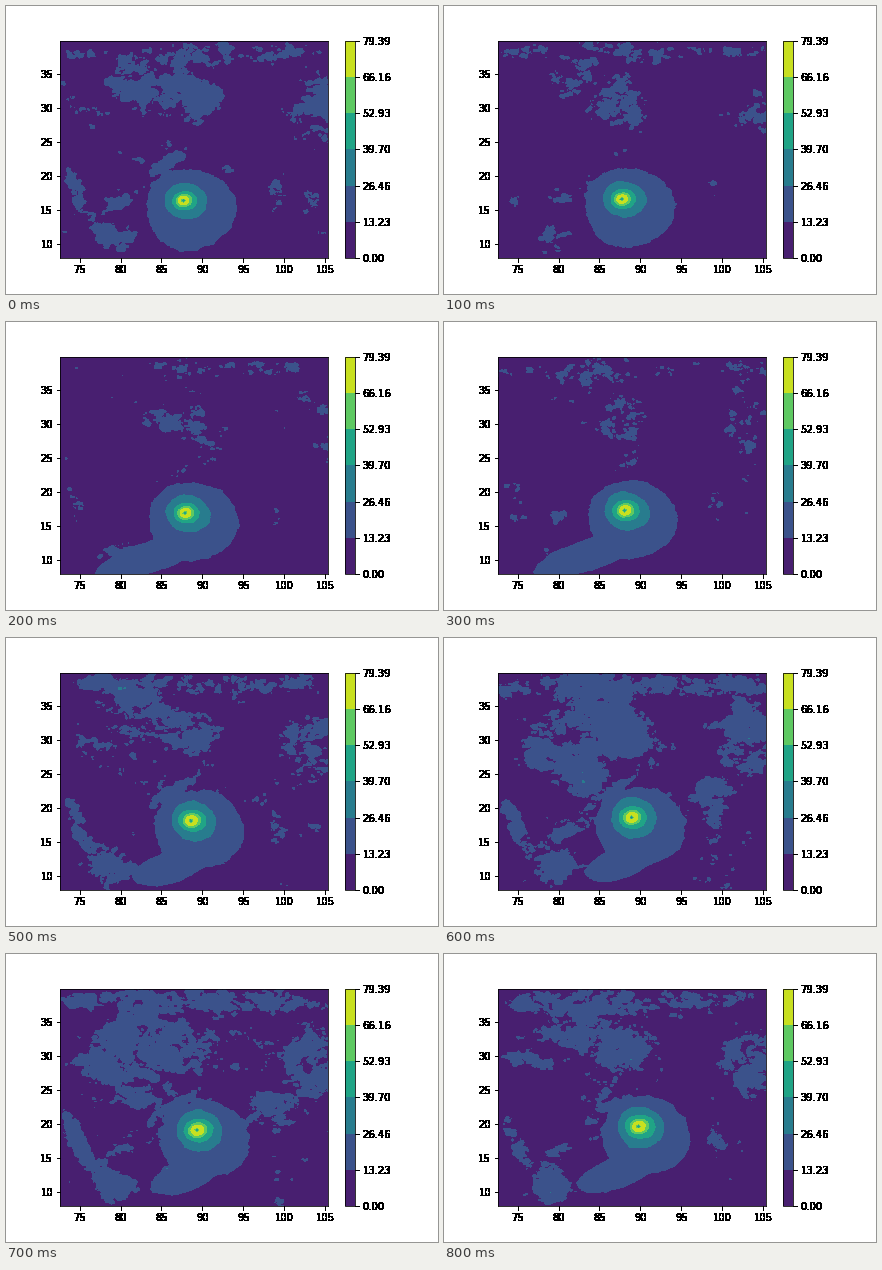
Animation of 432x288 px, one loop 0.9 s. Source, as a matplotlib script:

```python
import numpy as np
import matplotlib.pyplot as plt
from matplotlib.animation import ArtistAnimation

W, H, DPI = 432, 288, 72
FRAMES, STEP = 9, 100
TOP = 79.39
LEVELS = np.linspace(0, TOP, 7)
LON, LAT = (72.62, 105.29), (7.95, 40.0)
MAP_BOX = [0.125, 0.125, 0.62, 0.755]
BAR_BOX = [0.78375, 0.125, 0.02517, 0.755]
CALM, SOLID = -3.0, 3.0

# Grid in stage pixels, y downwards
x = np.linspace(54, 321.84, 224)
y = np.linspace(34.56, 252, 182)
X, Y = np.meshgrid(x, y)
lon = np.interp(x, x[[0, -1]], LON)
lat = np.interp(y, y[[0, -1]], LAT[::-1])


def make_noise(seed, size, slope):
    """Streaky fractal noise of unit variance; size is its largest scale."""
    white = np.random.default_rng(seed).standard_normal(X.shape)
    kx = np.fft.fftfreq(x.size, x[1] - x[0])
    ky = np.fft.fftfreq(y.size, y[1] - y[0])[:, None]
    gain = (1 + (2 * np.pi * size) ** 2 * (1.5 * kx**2 + 0.7 * ky**2)) ** -slope
    rough = np.fft.ifft2(np.fft.fft2(white) * gain).real
    return (rough - rough.mean()) / rough.std()


GROUND = make_noise(7, 9, 0.7)
WARP = make_noise(3, 12, 2)


def ellipse(cx, cy, rx, ry, tilt, edge):
    """Mask of a tilted ellipse with a ragged, soft rim."""
    c, s = np.cos(np.radians(tilt)), np.sin(np.radians(tilt))
    dx, dy = X - cx, Y - cy
    rho = np.hypot((c * dx + s * dy) / rx, (c * dy - s * dx) / ry)
    ragged = 1.0 if edge < 10 else 0.35
    return 1 / (1 + np.exp(np.clip(edge * (rho - 1 + 0.15 * ragged * WARP), -30, 30)))


# x, y, radii, tilt, mean density, daily swing
REGIONS = [
    (190, 46, 150, 13, 0, -0.2, 0.8),     # northern rim
    (165, 90, 57, 26, 12, -0.1, 1.0),     # plateau
    (298, 108, 34, 42, 0, -0.3, 0.8),     # eastern hills
    (271, 190, 9, 36, 0, -0.4, 0.6),      # south-east ridge
    (118, 122, 50, 20, 35, -2.5, 3.4),    # western plain
    (265, 150, 28, 24, 0, -2.5, 3.3),     # delta
    (72, 186, 31, 8, 63, 0.1, 1.4),       # west coast
    (108, 232, 18, 19, 0, 0.3, 1.4),      # southern tip
    (168, 153, 28, 6, -33, 0.0, 1.3),     # feeder band
    (130, 190, 42, 5, -25, -0.9, 1.0),    # east coast
]


def storm_path(i):
    u = i / (FRAMES - 1)
    return 177 + 17 * u**1.7, 194.5 - 22 * u**1.3


def daily_wind(i):
    """+1 at the windiest hour, -1 at the calmest."""
    return np.cos(2 * np.pi * (i - 6.5) / 8)


def ground_bias(i):
    day = daily_wind(i)
    cx, cy = storm_path(i)
    bias = np.full(X.shape, CALM + 0.9 * max(day, 0))

    def paint(density, mask):
        bias[:] += (density - bias) * mask

    for *shape, mean, swing in REGIONS:
        paint(mean + swing * day, ellipse(*shape, edge=7))
    tail = CALM + (SOLID - CALM) * min(1, i / 2)
    paint(max(tail, CALM), ellipse(cx - 24 + 16 * day, cy + 46, 45 - 12 * day,
                                   14, -18, edge=25) * min(1, i / 2))
    paint(SOLID, ellipse(cx + 11, cy + 9, 43, 39, 20, edge=30))
    return bias


def storm_wind(i, noise):
    cx, cy = storm_path(i)
    u = i / (FRAMES - 1)
    dx, dy = X - cx, Y - cy
    angle = np.arctan2(dy, dx)
    r = np.hypot(dx, 1.2 * dy) - 0.13 * dx - 0.03 * dy
    r *= 1 + 0.03 * noise + 0.04 * np.cos(2 * angle - r / 4)
    rings = np.array([5.2, 7.2, 11, 21]) + u * np.array([1.2, 1.6, 3, 2.5])
    radii = [0, 2.3, 3.2, *rings, rings[-1] + 6]
    return np.interp(r, radii, [24, 52.93, 72, *LEVELS[5:1:-1], 0])


def wind(i):
    noise = 0.6 * GROUND + 0.8 * make_noise(20 + i, 9, 0.7)
    bias = ground_bias(i)
    gusts = bias + noise / (1 + np.clip(bias - 1, 0, None) ** 2)
    plain = np.clip(LEVELS[1] + 3.6 * gusts, 0.5, None)
    plain = np.where(bias > 1.6, np.minimum(plain, 24), plain)
    return np.maximum(plain, storm_wind(i, noise))


def harden(image, dpi):
    """Turn every touched pixel solid black, for text without grey edges."""
    solid = np.zeros_like(image)
    solid[..., 3] = image[..., 3] > 0
    return solid, 0, 0


fig = plt.figure(figsize=(W / DPI, H / DPI), dpi=DPI, facecolor="white")
ax = fig.add_axes(MAP_BOX)
layers = [ax.contourf(lon, lat, wind(i), levels=LEVELS) for i in range(FRAMES)]
ax.set(xlim=LON, ylim=LAT, xticks=range(75, 106, 5), yticks=range(10, 36, 5))
bar = fig.add_axes(BAR_BOX)
fig.colorbar(layers[0], cax=bar, ticks=LEVELS, format="%.2f")

for part in (*ax.get_xticklabels(), *ax.get_yticklabels(), *bar.get_yticklabels(),
             *ax.get_xticklines(), *ax.get_yticklines(), *bar.get_yticklines()):
    part.set_agg_filter(harden)

anim = ArtistAnimation(fig, [[layer] for layer in layers], interval=STEP,
                       repeat=True, repeat_delay=0)
plt.show()
```
